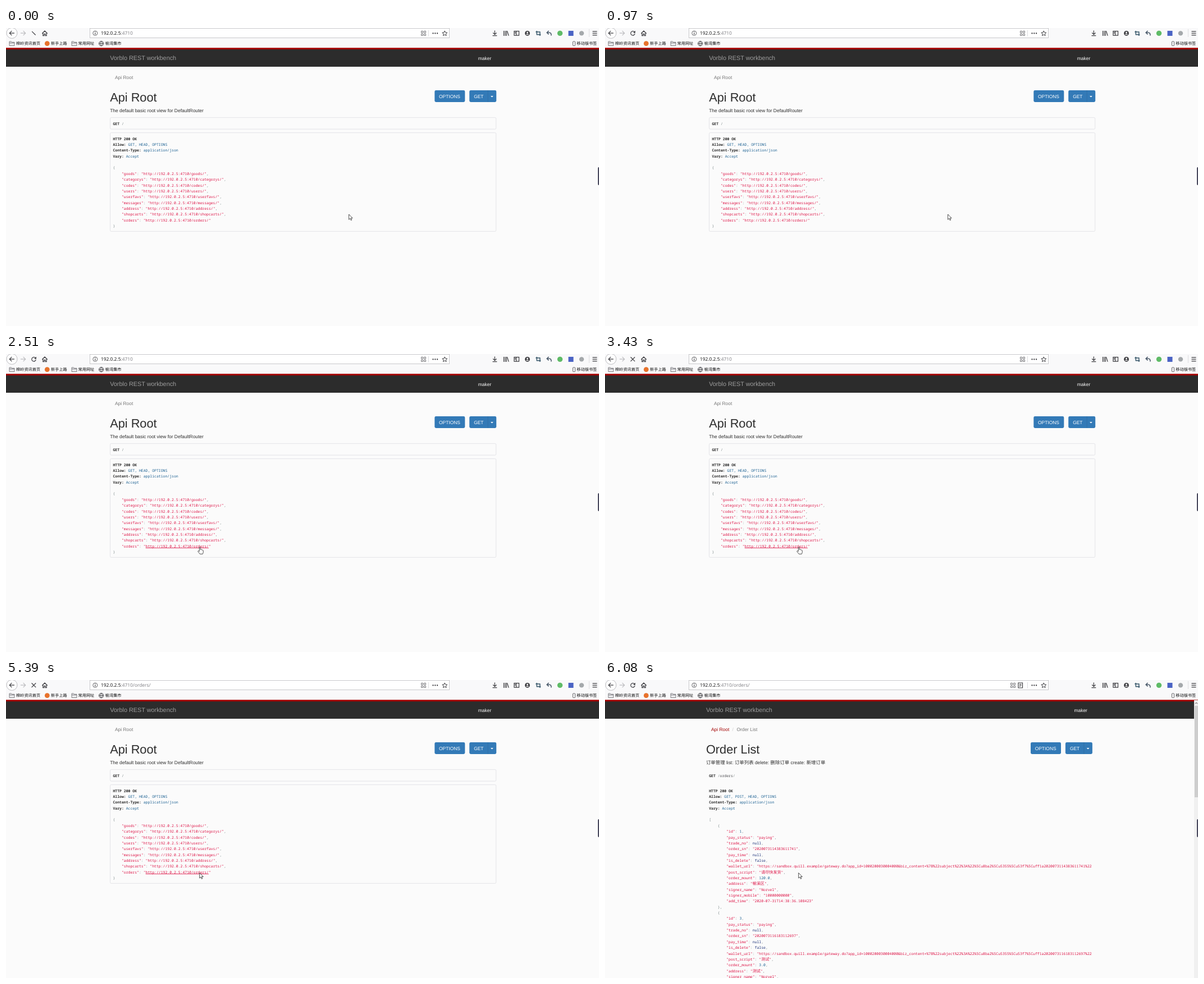
Animation, 1056 px wide and 531 px high, one loop 8 s. Source, as an HTML page:

```html
<!DOCTYPE html>
<html lang="zh-CN">
<head>
<meta charset="utf-8">
<title>Api Root</title>
<style>
  html, body { margin: 0; width: 100%; height: 100%; overflow: hidden; background: #fbfbfb; }
  svg { display: block; }
  text { white-space: pre; text-rendering: geometricPrecision; font: 8.44px "Liberation Sans", "Noto Sans CJK SC", sans-serif; fill: #2c2c2c; }
  .mark text { font: 7.2px "Noto Sans CJK SC", sans-serif; fill: #0c0c0d; }
  .url { font: 8.4px "Open Sans", "Noto Sans", sans-serif; fill: #0c0c0d; }
  .url .rest { fill: #7c7c80; }
  .code { font: 6.465px "Noto Sans Mono", "DejaVu Sans Mono", "Noto Sans CJK SC", monospace; fill: #48484c; }
  .code .b { font-weight: bold; fill: #2c2c2c; }
  .code .cjk { font: 7.1px "Noto Sans CJK SC", sans-serif; }
  .str { fill: #d14; } .kwd { fill: #1e347b; } .lit { fill: #195f91; } .pun { fill: #7d8a8a; }
  .h1 { font-size: 21.75px; }
  .brand { font-size: 10.85px; fill: #9d9d9d; }
  .white { fill: #fff; } .grey { fill: #777; } .red { fill: #a30000; }
  .line { fill: none; stroke: #3c3c40; stroke-width: 1.2; }
  .box { fill: none; stroke: #dedee2; stroke-width: .8; }
</style>
</head>
<body>
<svg width="1056" height="531" viewBox="0 0 1056 531">
  <rect width="1056" height="531" fill="#fbfbfb"/>
  <rect width="1056" height="36" fill="#f9f9fa"/>

  <!-- toolbar -->
  <circle cx="10.5" cy="9" r="9.5" fill="#fff" stroke="#b5b5b8" stroke-width=".9"/>
  <path class="line" d="M15 9.2H6.5M10.3 5.2l-4 4 4 4"/>
  <path class="line" style="stroke:#bcbcbf" d="M26 9.2h8.5M30.7 5.2l4 4-4 4"/>
  <g id="reload">
    <path id="arc" class="line" pathLength="1" d="M52.5 7.2A3.7 3.7 0 1 0 53.2 9.9"/>
    <path id="head" d="M54 4.8v3.9h-3.9z" fill="#3c3c40"/>
    <path id="down" class="line"/>
    <path id="up" class="line"/>
  </g>
  <path class="line" d="M64.3 9.8L69 5.2l4.7 4.6M65.8 9v4.6h2.1v-3h2.2v3h2.1V9"/>
  <rect x="149.5" y=".5" width="640" height="17" fill="#fff" stroke="#c8c8cb"/>
  <circle class="line" cx="158.8" cy="9.2" r="4" style="stroke-width:.8"/>
  <path class="line" d="M158.8 8.5v3M158.8 6.6v1"/>
  <text class="url" x="169" y="12.2">192.0.2.5<tspan class="rest" id="path"></tspan></text>
  <path id="grid" class="line" style="stroke:#77777b;stroke-width:1" d="M739.5 5.5h3v3h-3zM744.5 5.5h3v3h-3zM739.5 10.5h3v3h-3zM744.5 10.5h3v3h-3z"/>
  <path id="reader" class="line" d="M736 5h7.5v9H736zM738 7.5h3.5M738 9.5h3.5M738 11.5h2"/>
  <path d="M752.5 4v11M1038.5 2v14" stroke="#dcdcdf"/>
  <path d="M760.5 9.5h.01M764.3 9.5h.01M768.1 9.5h.01" stroke="#3c3c40" stroke-width="2.3" stroke-linecap="round"/>
  <path class="line" style="stroke-width:1" d="M781.3 5l1.3 3 3.2.3-2.4 2.1.7 3.2-2.8-1.7-2.8 1.7.7-3.2-2.4-2.1 3.2-.3z"/>
  <path class="line" d="M870.4 4.5v7M867.3 8.5l3.1 3.1 3.1-3.1M866.5 13.7h7.8"/>
  <path class="line" d="M886.5 5v9M889 5v9M891.3 5v9M892.5 5.4l2.7 8.4"/>
  <path class="line" d="M904.9 5.6h8.6v7.5h-8.6zM908.7 5.6v7.5M906 7.7h1.6M906 9.4h1.6"/>
  <circle cx="928.5" cy="9.4" r="4.4" fill="#3c3c40"/>
  <path d="M925.8 12a2.9 2.9 0 0 1 5.4 0z" fill="#f9f9fa"/><circle cx="928.5" cy="7.9" r="1.5" fill="#f9f9fa"/>
  <path class="line" style="stroke:#38576a;stroke-width:1.5" d="M945.3 5v6.7h7M943.3 7h7.5v7"/>
  <path class="line" style="stroke:#4b5a6b;stroke-width:1.6" d="M966.5 5l-3.3 3.2 3.3 3.2M963.5 8.2h4.2q3.5 0 3.2 5.3"/>
  <circle cx="986.5" cy="9.4" r="4.7" fill="#5fbb67"/>
  <rect x="1001.5" y="5" width="9" height="9" fill="#4a63c4"/>
  <circle cx="1025" cy="9.4" r="4.2" fill="#a4a8ab"/>
  <path class="line" d="M1044.5 6.2h8M1044.5 9.4h8M1044.5 12.6h8"/>

  <!-- bookmarks -->
  <g class="mark">
    <path id="folder" d="M6 24h3.5l1 1.3H15V31.5H6zM6 26.7h9" fill="#e9e9eb" stroke="#66666a" stroke-width=".8"/>
    <use href="#folder" x="111"/>
    <text x="18" y="30.2">棉岭资讯首页</text>
    <circle cx="73.3" cy="27.7" r="4.4" fill="#e8722c"/>
    <text x="80" y="30.2">新手上路</text>
    <text x="128.5" y="30.2">常用网址</text>
    <path class="line" style="stroke-width:.9" d="M165.5 27.7a4.2 4.2 0 1 0 8.4 0a4.2 4.2 0 1 0-8.4 0h8.4M169.7 23.5q-4 4.2 0 8.4q4-4.2 0-8.4"/>
    <text x="176.8" y="30.2">榆湾集市</text>
    <rect class="line" x="1009.5" y="24" width="4" height="7.5" rx=".8" style="stroke-width:.8"/>
    <text x="1016.3" y="30.2">移动版书签</text>
  </g>

  <!-- page -->
  <rect y="36" width="1056" height="33" fill="#2c2c2c"/>
  <rect y="35.3" width="1056" height="2.9" fill="#a30000"/>
  <g id="root"></g>
  <g id="orders"></g>
  <g id="scrollbar">
    <rect x="1049" y="36" width="7" height="495" fill="#f0f0f0"/>
    <rect x="1050" y="46" width="6" height="163" fill="#cdcdcd"/>
    <path class="line" d="M1051 42.3l2-2 2 2" style="stroke-width:1"/>
  </g>
  <path d="M1056 248h-.5q-1.5 0-1.5 2v28q0 2 1.5 2h.5z" fill="#47475c"/>

  <path id="link" d="M248.7 345.7H361" stroke="#d14" stroke-width=".8"/>
  <path id="arrow" d="M0 0V9.3L2.2 7.3 3.7 10.7 5.2 10 3.7 6.8H6.6z" fill="#fff" stroke="#222" stroke-width=".8"/>
  <path id="hand" d="M3 7V1.2q0-1 .9-1t.9 1V4.6q1.8-.5 2 .5q1.3-.3 1.6.6q1.5-.2 1.5 1V9.5q0 1.5-1 3.2H4L.8 8.6q-.8-1.2.3-1.6q.8-.2 1.9 1.2z" fill="#fff" stroke="#222" stroke-width=".8"/>
</svg>
<script>
const $ = id => document.getElementById(id);
const HOST = 'http://192.0.2.5:4710/';
const text = (x, y, s, cls = '') => `<text x="${x}" y="${y}" class="${cls}">${s}</text>`;
const span = (cls, s) => `<tspan class="${cls}">${s}</tspan>`;

// Colour one line of a response: status, header or JSON.
function highlight(line) {
  if (line.startsWith('HTTP')) return span('b', line);
  const header = line.match(/^([A-Z][\w-]*:)(.*)/);
  if (header) return span('b', header[1]) + span('lit', header[2]);
  return line.replace(/("[^"]*"?)|(null|false)|([\d.]+)|([{}\[\],:]+)/g, (s, str, kwd, num) =>
    span(str ? 'str' : kwd ? 'kwd' : num ? 'lit' : 'pun',
      s.replace(/&/g, '&amp;').replace(/[\u4e00-\u9fff]+/g, w => span('cjk', w))));
}

function page({ x, title, crumbs, about, path, lines }) {
  const button = (left, w) =>
    `<rect x="${x + left}" y="111" width="${w}" height="21" rx="2.4" fill="#337ab7"/>`;
  return text(x, 57, 'Vorblo REST workbench', 'brand') + text(x + 655.6, 56.6, 'maker', 'white') +
    crumbs + text(x, 131, title, 'h1') + text(x, 150.4, about) +
    button(578.1, 54) + button(640, 48) +
    `<path d="M${x + 673} 111v21" stroke="#2e6da4" stroke-width=".7"/>` +
    text(x + 585.8, 124.5, 'OPTIONS', 'white') + text(x + 648, 124.5, 'GET', 'white') +
    `<path d="M${x + 677.8} 121h4.8l-2.4 2.5z" fill="#fff"/>` +
    text(x + 5.3, 172.6, span('b', 'GET ') + path, 'code') +
    lines.map((l, i) => text(x + 5.3, 199.7 + i * 10.35, highlight(l), 'code')).join('');
}

const headers = methods => ['HTTP 200 OK', 'Allow: ' + methods, 'Content-Type: application/json', 'Vary: Accept', ''];
const routes = ['goods', 'categorys', 'codes', 'users', 'userfavs', 'messages', 'address', 'shopcarts', 'orders'];

function order(id, sn, note, mount, address, time) {
  const fields = {
    id, pay_status: 'paying', trade_no: null, order_sn: sn, pay_time: null, is_delete: false,
    wallet_url: 'https://sandbox.quill.example/gateway.do?app_id=1000200030004000&biz_content=' +
      `%7B%22subject%22%3A%22%5Cu8ba2%5Cu5355%5Cu53f7%5Cuff1a${sn}%22`,
    post_script: note, order_mount: mount, address, signer_name: 'Norvel', signer_mobile: '10000000000', add_time: time
  };
  const rows = Object.entries(fields).map(([key, value]) => {
    const quoted = typeof value === 'string' && !/^\d+\.0$/.test(value);
    const end = key === 'wallet_url' ? '' : (quoted ? '"' : '') + (key === 'add_time' ? '' : ',');
    return `        "${key}": ${quoted ? '"' : ''}${value}${end}`;
  });
  return ['    {', ...rows, '    },'];
}

$('root').innerHTML =
  '<rect class="box" x="185.5" y="159.6" width="687.2" height="20.6" rx="2"/>' +
  '<rect class="box" x="185.5" y="186.6" width="687.2" height="175.8" rx="2"/>' +
  page({
    x: 185.2, title: 'Api Root', crumbs: text(194, 91.3, 'Api Root', 'grey'),
    about: 'The default basic root view for DefaultRouter', path: span('pun', '/'),
    lines: [...headers('GET, HEAD, OPTIONS'), '{',
      ...routes.map((r, i) => `    "${r}": "${HOST}${r}/"${i < 8 ? ',' : ''}`), '}']
  });

$('orders').innerHTML = page({
  x: 179.9, title: 'Order List',
  crumbs: text(189, 91.3, 'Api Root', 'red') + `<text x="226.5" y="91.3" style="fill:#ccc">/</text>` + text(234.4, 91.3, 'Order List', 'grey'),
  about: '订单管理 list: 订单列表 delete: 删除订单 create: 新增订单',
  path: span('pun', '/') + 'orders' + span('pun', '/'),
  lines: [...headers('GET, POST, HEAD, OPTIONS'), '[',
    ...order(1, '2020073114383611741', '请尽快发货', '120.0', '榆溪区', '2020-07-31T14:38:36.108423'),
    ...order(3, '2020073116183112697', '测试', '3.0', '测试', '2020-07-31T16:18:31.108423')]
});

// time, "\" length, "/" length, drawn share of the reload ring
const spinner = [
  [0, .85, 0, 0], [150, .4, 0, 0], [340, 0, 0, .2], [470, 0, 0, .45], [590, 0, 0, .7], [720, 0, 0, .9], [970, 0, 0, 1],
  [3070, 0, .4, 0], [3190, .3, .8, 0], [3310, .7, 1, 0], [3430, 1, 1, 0],
  [5660, .85, 0, 0], [5790, 0, 0, .3], [5930, 0, 0, .75], [6080, 0, 0, 1]
];
// time, pointer tip
const pointer = [
  [0, 610.6, 332], [1370, 608, 331], [1490, 602.6, 330], [1640, 560, 325.5], [1760, 488.5, 331], [1880, 417.5, 347],
  [2000, 390.3, 354], [2120, 366, 354], [2240, 351, 352], [2390, 346, 345], [2510, 344.7, 343.7]
];
const at = (keys, t) => keys.findLast(k => k[0] <= t);
const show = (id, on) => $(id).style.display = on ? '' : 'none';

function draw(now) {
  const t = now % 8000;
  const loaded = t >= 5540;

  const [, down, up, ring] = at(spinner, t);
  const a = 3.8 * down, b = 3.8 * up;
  $('down').setAttribute('d', `M${49.4 - a} ${9.3 - a}l${2 * a} ${2 * a}`);
  $('up').setAttribute('d', `M${49.4 - b} ${9.3 + b}l${2 * b} ${-2 * b}`);
  show('down', down); show('up', up); show('arc', ring); show('head', ring === 1);
  $('arc').setAttribute('stroke-dasharray', ring + ' 2');
  $('reload').setAttribute('opacity', loaded && t < 5660 ? .35 : 1);

  $('path').textContent = ':4710' + (t >= 5270 ? '/orders/' : '');
  show('root', !loaded); show('orders', loaded); show('scrollbar', loaded); show('reader', loaded);
  $('grid').setAttribute('transform', `translate(${loaded ? -17 : 0})`);

  const [, x, y] = at(pointer, t);
  const hand = t >= 2390 && t < 5390;
  show('hand', hand); show('arrow', !hand); show('link', t >= 2390 && !loaded);
  $('arrow').setAttribute('transform', `translate(${x} ${y})`);
  $('hand').setAttribute('transform', `translate(${x - 3.4} ${y})`);
  requestAnimationFrame(draw);
}
requestAnimationFrame(draw);
</script>
</body>
</html>
```
